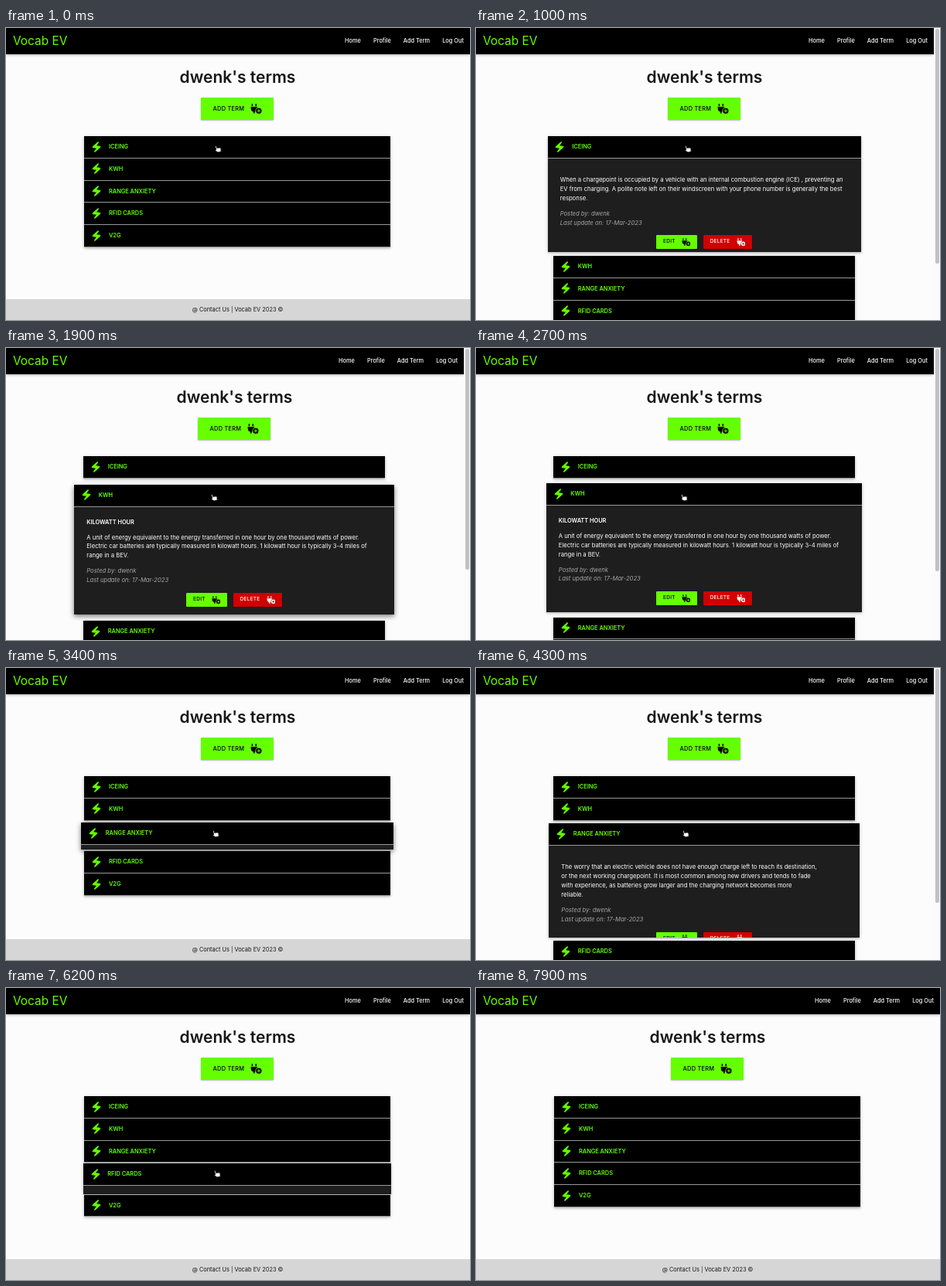
Animation, 600 px wide and 378 px high, one loop 8000 ms. Source, as an HTML page:

```html
<!DOCTYPE html>
<html lang="en">
<head>
<meta charset="utf-8">
<title>Vocab EV</title>
<style>
  * { box-sizing: border-box; margin: 0; padding: 0; }
  html, body { width: 100%; height: 100%; overflow: hidden; background: #fcfcfc; }
  body { position: relative; font: 500 7.4px/12px Inter, sans-serif; color: #161616; white-space: nowrap; }
  #stage { position: absolute; left: 0; top: 0; width: 600px; height: 378px; overflow: hidden; background: #fcfcfc; }
  #page { position: absolute; left: 0; top: 0; width: 600px; height: 378px; }
  header {
    position: absolute; left: 0; top: 0; width: 100%; height: 34px; padding: 0 8px 0 9px;
    display: flex; align-items: center; gap: 16px; background: #000; color: #fff;
    box-shadow: 0 1px 3px rgba(0, 0, 0, .3);
  }
  .brand { margin-right: auto; font-size: 15.4px; font-weight: 400; color: #6f0; }
  h1 { position: absolute; top: 50px; width: calc(100% - 1px); text-align: center; font: 600 21px/28px Inter, sans-serif; }
  .btn {
    display: flex; align-items: center; justify-content: center; gap: 8px;
    background: var(--bg); border-radius: 1px; letter-spacing: .25px;
    box-shadow: 0 1px 2px rgba(0, 0, 0, .25);
  }
  .btn svg { fill: currentColor; }
  .add { --bg: #6f0; position: absolute; left: calc(50% - 48px); top: 89.8px; width: 94.4px; height: 29.6px; color: #000; }
  ul { position: absolute; top: 140.2px; left: calc((100% - 1px) * .15 - .4px); width: calc((100% - 1px) * .7); list-style: none; }
  li { margin: 0 12px; background: #1e1e1e; box-shadow: 0 1px 2.5px rgba(0, 0, 0, .2), 0 1px 5px rgba(0, 0, 0, .16); }
  li.active { box-shadow: 0 2.5px 5.5px rgba(0, 0, 0, .32), 0 2px 7.5px rgba(0, 0, 0, .26); }
  .head {
    position: relative; height: 28.7px; padding-left: 31.5px; border-bottom: 1px solid #999;
    background: #000; color: #6f0; font-weight: 600; line-height: 27.4px;
  }
  .head svg { position: absolute; left: 7.8px; top: 5.6px; fill: #6f0; stroke: #6f0; stroke-width: 1.4; stroke-linejoin: round; }
  .body { height: 0; overflow: hidden; color: #fff; font-weight: 400; font-size: 7.65px; line-height: 11.9px; }
  .text { padding: 14px 16px 0; }
  .text b { display: block; font-weight: 600; font-size: 7.4px; line-height: 12px; }
  .text p { margin-top: 8px; }
  .text p.meta { font-style: italic; color: #a6a6a6; }
  .row { display: flex; justify-content: center; gap: 8px; margin-top: 9.9px; }
  .row .btn { height: 18px; font-size: 6.5px; font-weight: 500; }
  .edit { --bg: #6f0; width: 52.5px; color: #000; }
  .del { --bg: #d00000; width: 63px; color: #fff; }
  footer {
    position: absolute; left: 0; top: 351px; width: 100%; height: 27px; padding-right: 1px;
    background: #d6d6d6; text-align: center; font-weight: 400; line-height: 27px;
  }
  #bar { position: absolute; left: 592px; top: 0; width: 8px; height: 378px; background: #fafafa; }
  #thumb { position: absolute; left: 1.5px; top: 1px; width: 5.5px; border-radius: 3px; background: #c1c1c1; }
  #cursor { position: absolute; left: -5px; top: -5.5px; overflow: visible; fill: #fff; stroke: #111; stroke-width: .8; stroke-linejoin: round; }
</style>
</head>
<body>
<div id="stage">
  <div id="page">
    <h1>dwenk's terms</h1>
    <div class="btn add">ADD TERM</div>
    <ul id="list"></ul>
    <footer id="footer">@ Contact Us | Vocab EV 2023 ©</footer>
    <header><span class="brand">Vocab EV</span><span>Home</span><span>Profile</span><span>Add Term</span><span>Log Out</span></header>
  </div>
  <div id="bar"><div id="thumb"></div></div>
  <svg id="cursor" width="10" height="11" viewBox="0 0 9 10">
    <path id="hand" transform="rotate(-15 4.5 5)" d="M2.2 1.2q.7-.9 1.4 0v2.4l3.3.6q1.3.3 1.1 1.6L7.4 9H3.5L.9 6.1q0-1.1 1.3-.5z"/>
    <path id="arrow" d="M2 .8v7.4l1.8-1.6 1.1 2.6 1.3-.6-1.1-2.4h2.3z"/>
  </svg>
</div>
<script>
const LOOP = 8000, STEP = 100, VIEW = 378;
const TOP = 140.2, HEAD = 28.7, LINE = 11.9, BELOW = 59, FOOT = 27;
const $ = id => document.getElementById(id);

const terms = [
  { name: 'ICEING', open: 160, close: 930, lines: [
    'When a chargepoint is occupied by a vehicle with an internal combustion engine (ICE) , preventing an',
    'EV from charging. A polite note left on their windscreen with your phone number is generally the best',
    'response.'] },
  { name: 'KWH', open: 1520, close: 2660, title: 'KILOWATT HOUR', lines: [
    'A unit of energy equivalent to the energy transferred in one hour by one thousand watts of power.',
    'Electric car batteries are typically measured in kilowatt hours. 1 kilowatt hour is typically 3-4 miles of',
    'range in a BEV.'] },
  { name: 'RANGE ANXIETY', open: 3335, close: 4200, lines: [
    'The worry that an electric vehicle does not have enough charge left to reach its destination,',
    'or the next working chargepoint. It is most common among new drivers and tends to fade',
    'with experience, as batteries grow larger and the charging network becomes more',
    'reliable.'] },
  { name: 'RFID CARDS', open: 5021, close: 5985, title: 'RADIO FREQUENCY IDENTIFICATION', lines: [
    'Contactless cards used to start and stop a charging session at a public chargepoint.'] },
  { name: 'V2G', open: Infinity, close: Infinity, title: 'VEHICLE TO GRID', lines: ['Sending stored energy back to the grid.'] }
];

const bolt = `<svg width="16" height="16" viewBox="0 0 24 24"><path d="M14.7 2.7 4.8 11.5c-.6.6-.3 1.6.6 1.7L13 14l-4.8 6.5c-.5.8.4 1.4 1.1.8l9.9-8.8c.6-.6.3-1.6-.6-1.7L11 10l4.9-6.5c.4-.8-.5-1.4-1.2-.8z"/></svg>`;
const plug = w => `<svg width="${w}" height="${w * 16 / 18}" viewBox="0 0 18 16">
  <path d="M2 4V1q1-2 2 0v3zM8 4V1q1-2 2 0v3zM1 5h10q1 1 0 2v1a5 5 0 0 1-4 4.9V15q-1 2-2 0v-2.1A5 5 0 0 1 1 8V7Q0 6 1 5z"/>
  <circle cx="13.5" cy="11.5" r="5" stroke="var(--bg)"/>
  <path d="M13.5 9v5M11 11.5h5" stroke="var(--bg)" stroke-width="1.2"/></svg>`;

document.querySelector('.add').insertAdjacentHTML('beforeend', plug(14.5));
$('list').innerHTML = terms.map(({ name, title, lines }) => `<li>
  <div class="head">${bolt}${name}</div>
  <div class="body"><div class="text">${title ? `<b>${title}</b>` : ''}<p>${lines.join('<br>')}</p>
    <p class="meta">Posted by: dwenk<br>Last update on: 17-Mar-2023</p>
    <div class="row"><div class="btn edit">EDIT ${plug(11.5)}</div><div class="btn del">DELETE ${plug(11.5)}</div></div>
  </div></div></li>`).join('');
const rows = [...$('list').children];

const clamp = v => Math.min(1, Math.max(0, v));
const inOutCubic = x => x < .5 ? 4 * x ** 3 : 1 - 4 * (1 - x) ** 3;

// cubic-bezier(.25, .46, .45, .94), solved by bisection
function outQuad(x) {
  const curve = (s, a, b) => 3 * a * s * (1 - s) ** 2 + 3 * b * s * s * (1 - s) + s ** 3;
  let lo = 0, hi = 1;
  for (let i = 0; i < 20; i++) {
    const mid = (lo + hi) / 2;
    if (curve(mid, .25, .45) < x) lo = mid; else hi = mid;
  }
  return curve(hi, .46, .94);
}

// 0 = closed, 1 = open
const phase = (t, { open, close }, ms, ease) =>
  t < open ? 0 : t < close ? ease(clamp((t - open) / ms)) : 1 - ease(clamp((t - close) / ms));

const path = [
  [0, 274, 156], [1150, 274, 156], [1450, 269, 193], [2950, 269, 193], [3250, 271, 214],
  [4500, 271, 214], [4850, 273, 240], [6850, 273, 240], [7200, 310, 262], [7500, 470, 226],
  [7700, 574, 192], [7800, 594, 196], [LOOP, 620, 200]
];
function cursorAt(t) {
  const i = path.findIndex(p => p[0] > t);
  const [t0, x0, y0] = path[i - 1], [t1, x1, y1] = path[i];
  const k = (t - t0) / (t1 - t0);
  return [x0 + (x1 - x0) * k, y0 + (y1 - y0) * k];
}

function draw(t) {
  let end = TOP + HEAD * rows.length;
  terms.forEach((term, i) => {
    const pop = phase(t, term, 350, outQuad), slide = phase(t, term, 300, inOutCubic);
    const full = 92.1 + LINE * term.lines.length + (term.title ? 12 : 0);
    const height = full * slide, gap = 8 * pop, above = i ? gap : 0;
    const row = rows[i];
    row.className = t >= term.open && t < term.close ? 'active' : '';
    row.style.margin = `${above}px ${12 * (1 - pop)}px ${gap}px`;
    row.lastElementChild.style.height = height + 'px';
    end += height + above + gap;
  });

  const doc = Math.max(VIEW, end + BELOW), scrolls = doc > VIEW;
  $('page').style.width = (scrolls ? 592 : 600) + 'px';
  $('footer').style.top = doc - FOOT + 'px';
  $('bar').style.display = scrolls ? 'block' : 'none';
  $('thumb').style.height = VIEW * VIEW / doc - 1 + 'px';

  const [x, y] = cursorAt(t), onList = x < 497;
  $('cursor').style.transform = `translate(${x}px, ${y}px)`;
  $('cursor').style.display = t < 7900 ? 'block' : 'none';
  $('hand').style.display = onList ? 'inline' : 'none';
  $('arrow').style.display = onList ? 'none' : 'inline';
}

const start = performance.now();
function tick() {
  const t = (performance.now() - start) % LOOP;
  draw(Math.floor(t / STEP) * STEP);
  requestAnimationFrame(tick);
}
tick();
</script>
</body>
</html>
```
